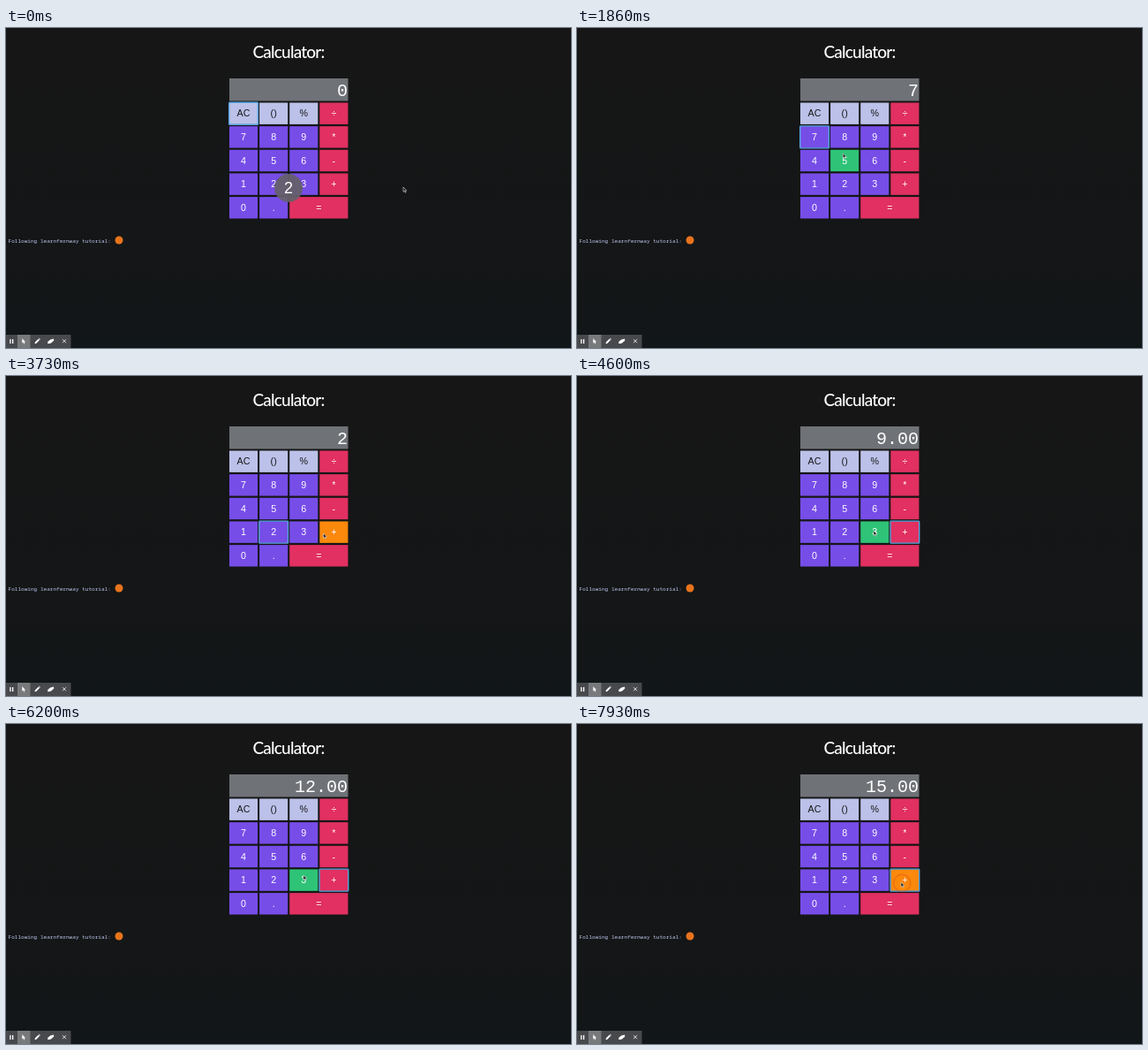
Write an HTML page that moves like this. It is 640x362 px and loops after 8 s.

```html
<!DOCTYPE html>
<html lang="en">
<head>
<meta charset="utf-8">
<title>Calculator</title>
<style>
  html, body { margin: 0; width: 100%; height: 100%; overflow: hidden; background: #151617; }
  svg { display: block; width: 100%; height: 100%; }
  text { font-family: "Liberation Sans", sans-serif; fill: #fff; }
  .mid { text-anchor: middle; }
  .title { font: 500 19px Lato, sans-serif; letter-spacing: -.8px; }
  .label { font-size: 10.7px; }
  .display { font: 20px "Liberation Mono", monospace; text-anchor: end; }
  .note { font: 6.07px "Noto Sans Mono", monospace; fill: #bcc6ec; }
</style>
</head>
<body>
<svg id="stage" viewBox="0 0 640 362">
  <defs>
    <linearGradient id="page" x2="0" y2="1">
      <stop offset="0" stop-color="#161616"/>
      <stop offset=".75" stop-color="#141617"/>
      <stop offset="1" stop-color="#111618"/>
    </linearGradient>
    <path id="arrow" d="M0 0V5.4L1.3 4.2L2.2 6.2L3 5.9L2.2 3.9H3.9Z"/>
  </defs>
  <rect width="640" height="362" fill="url(#page)"/>
  <text class="title" x="279.5" y="34">Calculator:</text>
  <rect x="253" y="57" width="134.5" height="25.5" fill="#6f7277"/>
  <text id="display" class="display" x="387" y="77"></text>
  <g id="keys"></g>
  <rect id="ring" fill="none" stroke="#58a6e2" stroke-width="1.4" rx=".8"/>

  <text class="note" x="2.5" y="243">Following learnfernway tutorial:</text>
  <circle cx="128" cy="240" r="4.5" fill="#e8741c"/>

  <g id="toolbar" fill="#fff">
    <rect y="347" width="73.5" height="15" fill="#47494c"/>
    <rect x="13" y="347" width="14.5" height="15" fill="#77797b"/>
    <path d="M4.3 352h1.3v5H4.3zM7 352h1.3v5H7z"/>
    <use href="#arrow" x="18.3" y="351.3"/>
    <path d="M32.5 357.2l.5-1.9 3.6-3.6 1.4 1.4-3.6 3.6zM37 351.3l.6-.5 1.4 1.4-.6.6z"/>
    <path d="M47.2 355l3-2.6 3.8-.8.3 1.9-3.3 2.9-3.6.8z"/>
    <path d="M64 352.2l4 4m0-4l-4 4" stroke="#fff" stroke-width=".8"/>
  </g>

  <g id="countdown">
    <circle cx="320" cy="181" r="16" fill="#65616a" fill-opacity=".94"/>
    <text class="mid" x="320" y="187.3" font-size="18">2</text>
  </g>
  <circle id="ripple" r="9.7" fill="#ff6a00" fill-opacity=".15" stroke="#d64a10" stroke-width="1.4"/>
  <use id="cursor" href="#arrow" fill="#161616" stroke="#eee" stroke-width=".55"/>
</svg>
<script>
const LOOP = 8000;
const byId = id => document.getElementById(id);

const kinds = {
  tool:   { fill: '#bcc1e9', hover: '#d3d7f3', text: '#161616' },
  digit:  { fill: '#774de8', hover: '#2fc377', text: '#fff' },
  action: { fill: '#e13061', hover: '#fa890c', text: '#fff' }
};
const layout = [['AC', '()', '%', '÷'], ['7', '8', '9', '*'], ['4', '5', '6', '-'], ['1', '2', '3', '+'], ['0', '.', '=']];

function add(parent, tag, attrs, text = '') {
  const node = document.createElementNS('http://www.w3.org/2000/svg', tag);
  setAttrs(node, attrs);
  node.textContent = text;
  return parent.appendChild(node);
}
function setAttrs(node, attrs) {
  for (const name in attrs) node.setAttribute(name, attrs[name]);
}

const keys = layout.flatMap((row, r) => row.map((label, c) => {
  const kind = kinds[c === 3 || label === '=' ? 'action' : r ? 'digit' : 'tool'];
  const box = { x: 253 + 34.1 * c, y: 84.5 + 26.65 * r, width: label === '=' ? 66.2 : 32.1, height: 24.4 };
  const rect = add(byId('keys'), 'rect', box);
  add(byId('keys'), 'text', {
    class: 'label mid', x: box.x + box.width / 2, y: box.y + 15.9, fill: kind.text, style: `fill:${kind.text}`
  }, label);
  return { label, kind, box, rect };
}));

// Cursor stops: time, x, y
const stops = [
  [0, 450, 180], [60, 450, 180], [200, 380, 163], [400, 340, 150], [860, 294, 137], [1000, 290, 136],
  [1300, 269, 123], [1600, 269, 123], [2250, 360, 176], [2700, 360, 176], [3050, 303, 176],
  [3250, 303, 176], [3600, 359.5, 178], [3980, 359.5, 178], [4500, 336, 175], [4850, 336, 175],
  [5300, 363.5, 177], [5600, 363.5, 177], [6200, 337, 171], [7130, 337, 171], [7600, 367, 179], [LOOP, 367, 179]
];
// Presses: time, key, display after release
const presses = [
  [1430, '7', '7'], [2400, '+', '7'], [3130, '2', '2'], [3860, '+', '9.00'],
  [4680, '3', '3'], [5400, '+', '12.00'], [6450, '3', '3'], [7700, '+', '15.00']
];
const RELEASE = 90, RIPPLE = 300;

function cursorAt(t) {
  const i = stops.findIndex(s => s[0] > t);
  const [t0, x0, y0] = stops[i - 1], [t1, x1, y1] = stops[i];
  const p = (t - t0) / (t1 - t0), ease = p * p * (3 - 2 * p);
  return [x0 + (x1 - x0) * ease, y0 + (y1 - y0) * ease];
}

function render(t) {
  const [x, y] = cursorAt(t);
  setAttrs(byId('cursor'), { x, y });
  for (const { box, kind, rect } of keys) {
    const over = x >= box.x && x <= box.x + box.width && y >= box.y && y <= box.y + box.height;
    rect.setAttribute('fill', over ? kind.hover : kind.fill);
  }

  const pressed = presses.findLast(p => t >= p[0]);
  const released = presses.findLast(p => t >= p[0] + RELEASE);
  byId('display').textContent = released ? released[2] : '0';

  const focus = keys.find(k => k.label === (pressed ? pressed[1] : t < 130 ? 'AC' : ''));
  byId('ring').style.display = focus ? '' : 'none';
  if (focus) {
    const { x, y, width, height } = focus.box;
    setAttrs(byId('ring'), { x: x - .3, y: y - .3, width: width + .6, height: height + .6 });
  }

  const age = pressed ? t - pressed[0] : RIPPLE;
  const opacity = age < 120 ? 1 : Math.max(0, 1 - (age - 120) / (RIPPLE - 120));
  setAttrs(byId('ripple'), { cx: x + 1.2, cy: y + .8, opacity });
  byId('countdown').setAttribute('opacity', Math.min(1, Math.max(0, (200 - t) / 140)));
}

const start = performance.now();
function frame() {
  render((performance.now() - start) % LOOP);
  requestAnimationFrame(frame);
}
frame();
</script>
</body>
</html>
```
